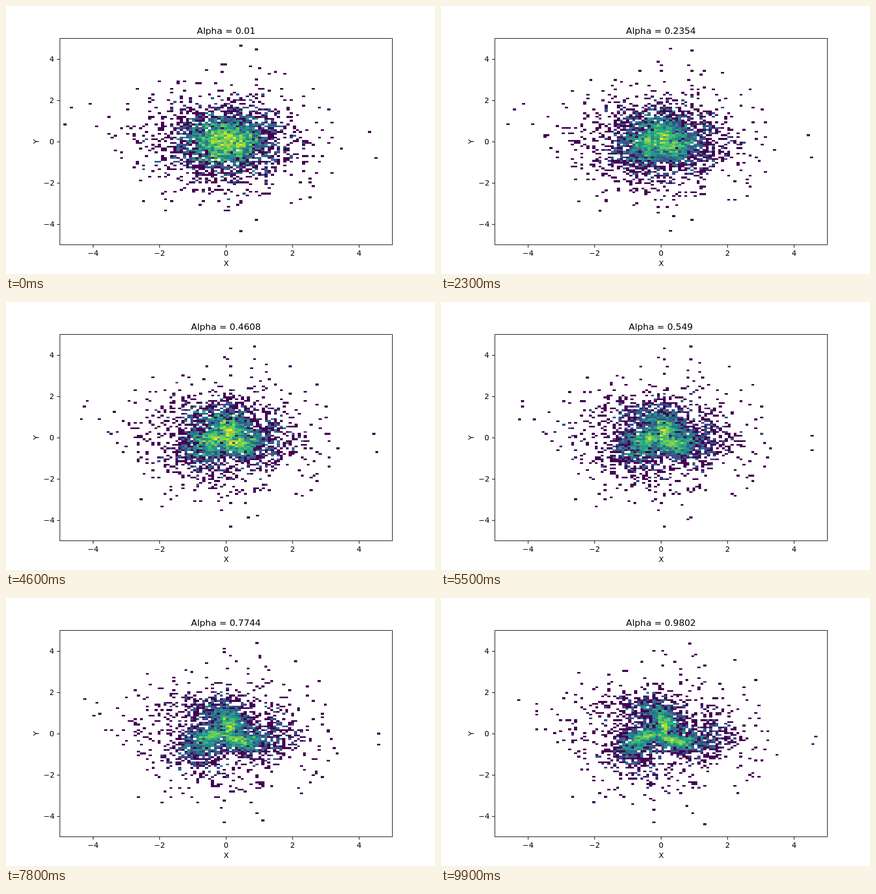
These frames come from a looping animation (800x500 px, 10 s). An HTML page with a canvas:

```html
<!DOCTYPE html>
<html lang="en">
<head>
<meta charset="utf-8">
<title>Alpha</title>
<style>
  html, body { margin: 0; width: 100%; height: 100%; overflow: hidden; background: #fff; }
  canvas { display: block; }
</style>
</head>
<body>
<canvas id="plot" width="800" height="500"></canvas>
<script>
const ctx = document.getElementById('plot').getContext('2d');
const LEFT = 100, RIGHT = 720, TOP = 60, BOTTOM = 445;
const STEPS = 100, STEP_MS = 100, BINS = 100;
const px = x => 410 + 62 * x;
const py = y => 252.5 - 38.5 * y;
const mix = (a, b, t) => a + (b - a) * t;
const clamp = t => Math.max(0, Math.min(1, t));

const VIRIDIS = ['440154', '472d7b', '3b528b', '2c728e', '21918c',
  '28ae80', '5ec962', 'addc30', 'fde725'].map(h =>
  [0, 2, 4].map(i => parseInt(h.slice(i, i + 2), 16)));

function viridis(t) {
  const s = clamp(t) * (VIRIDIS.length - 1);
  const i = Math.min(VIRIDIS.length - 2, Math.floor(s));
  const rgb = VIRIDIS[i].map((c, k) => Math.round(mix(c, VIRIDIS[i + 1][k], s - i)));
  return `rgb(${rgb})`;
}

let seed = 20417;
function random() {
  seed = (seed + 0x6D2B79F5) | 0;
  let t = Math.imul(seed ^ (seed >>> 15), 1 | seed);
  t = (t + Math.imul(t ^ (t >>> 7), 61 | t)) ^ t;
  return ((t ^ (t >>> 14)) >>> 0) / 4294967296;
}
const gauss = () =>
  Math.sqrt(-2 * Math.log(1 - random())) * Math.cos(2 * Math.PI * random());

// Gathers a point's angle into the nearest of three curved arms.
function toArm(x, y) {
  const r = Math.hypot(x, y);
  const deg = Math.atan2(y, x) * 180 / Math.PI;
  const arm = 90 + 30 * (Math.min(r, 2.2) - 1);
  const off = ((deg - arm + 60) % 120 + 120) % 120 - 60;
  const u = off / 60;
  const fade = clamp((r - 1.6) / 1.2);
  const bent = 60 * mix(0.4 * u + 0.6 * u ** 5, u, fade);
  const a = (deg - off + bent) * Math.PI / 180;
  const jitter = mix(0.07, 0.28, fade);
  return [r * Math.cos(a) + jitter * gauss(), r * Math.sin(a) + jitter * gauss()];
}

// The extreme points set the extent of the bins: start and end in pixels.
const points = [
  [110, 221, 176, 217], [121, 189, 181, 199], [156, 181, 145, 189],
  [690, 284, 693, 272], [679, 235, 699, 259],
  [438, 74, 398, 99], [467, 81, 465, 85],
  [438, 420, 398, 418], [415, 383, 493, 422]
];

function scatter(count, sigma) {
  while (count > 0) {
    const x = sigma * gauss(), y = sigma * gauss();
    if (Math.hypot(x, y) > 3.95) continue;
    const [ex, ey] = toArm(x, y);
    points.push([px(x), py(y), px(ex), py(ey)]);
    count--;
  }
}
scatter(740, 0.45);
scatter(1870, 0.8);
scatter(700, 1.45);

function range(values, pad) {
  const lo = Math.min(...values) - pad;
  return { lo, size: (Math.max(...values) + pad - lo) / BINS };
}

function drawBins(t) {
  const xs = points.map(p => mix(p[0], p[2], t));
  const ys = points.map(p => mix(p[1], p[3], t));
  const h = range(xs, 2.9), v = range(ys, 1.75);
  const bins = new Uint16Array(BINS * BINS);
  xs.forEach((x, i) => {
    const c = Math.floor((x - h.lo) / h.size);
    const r = Math.floor((ys[i] - v.lo) / v.size);
    bins[r * BINS + c]++;
  });
  const top = Math.log(Math.max(...bins));
  bins.forEach((n, i) => {
    if (!n) return;
    const c = i % BINS, r = Math.floor(i / BINS);
    const x0 = Math.round(h.lo + c * h.size), x1 = Math.round(h.lo + (c + 1) * h.size);
    const y0 = Math.round(v.lo + r * v.size), y1 = Math.round(v.lo + (r + 1) * v.size);
    ctx.fillStyle = viridis(Math.log(n) / top);
    ctx.fillRect(x0, y0, x1 - x0, y1 - y0);
  });
}

// Places text on whole pixels; anchor 0.5 centres it, 1 aligns it right.
function label(text, x, y, size = 13.889, anchor = 0.5) {
  ctx.font = `${size}px "DejaVu Sans", sans-serif`;
  ctx.fillText(text, Math.round(x - anchor * ctx.measureText(text).width), y);
}

function drawAxes(alpha) {
  ctx.fillStyle = '#000';
  ctx.fillRect(LEFT, TOP, RIGHT - LEFT + 1, 1);
  ctx.fillRect(LEFT, BOTTOM, RIGHT - LEFT + 1, 1);
  ctx.fillRect(LEFT, TOP, 1, BOTTOM - TOP + 1);
  ctx.fillRect(RIGHT, TOP, 1, BOTTOM - TOP + 1);
  for (let n = -4; n <= 4; n += 2) {
    const text = String(n).replace('-', '\u2212');
    const x = px(n), y = Math.round(py(n));
    ctx.fillRect(x, BOTTOM + 1, 1, 5);
    ctx.fillRect(LEFT - 5, y, 5, 1);
    label(text, x, 466);
    label(text, 90.3, y + 5, undefined, 1);
  }
  label('X', 410.5, 485);
  ctx.save();
  ctx.translate(61, 253);
  ctx.rotate(-Math.PI / 2);
  label('Y', 0, 0);
  ctx.restore();
  label('Alpha = ' + Number(alpha.toFixed(4)), 410, 52, 16.667);
}

let shown = -1;
function draw(now) {
  const step = Math.floor(now / STEP_MS) % STEPS;
  if (step !== shown) {
    shown = step;
    ctx.fillStyle = '#fff';
    ctx.fillRect(0, 0, 800, 500);
    drawBins(step / (STEPS - 1));
    drawAxes(0.01 + 0.0098 * step);
  }
}

function tick(now) {
  draw(now);
  requestAnimationFrame(tick);
}
draw(0);
requestAnimationFrame(tick);
</script>
</body>
</html>
```
